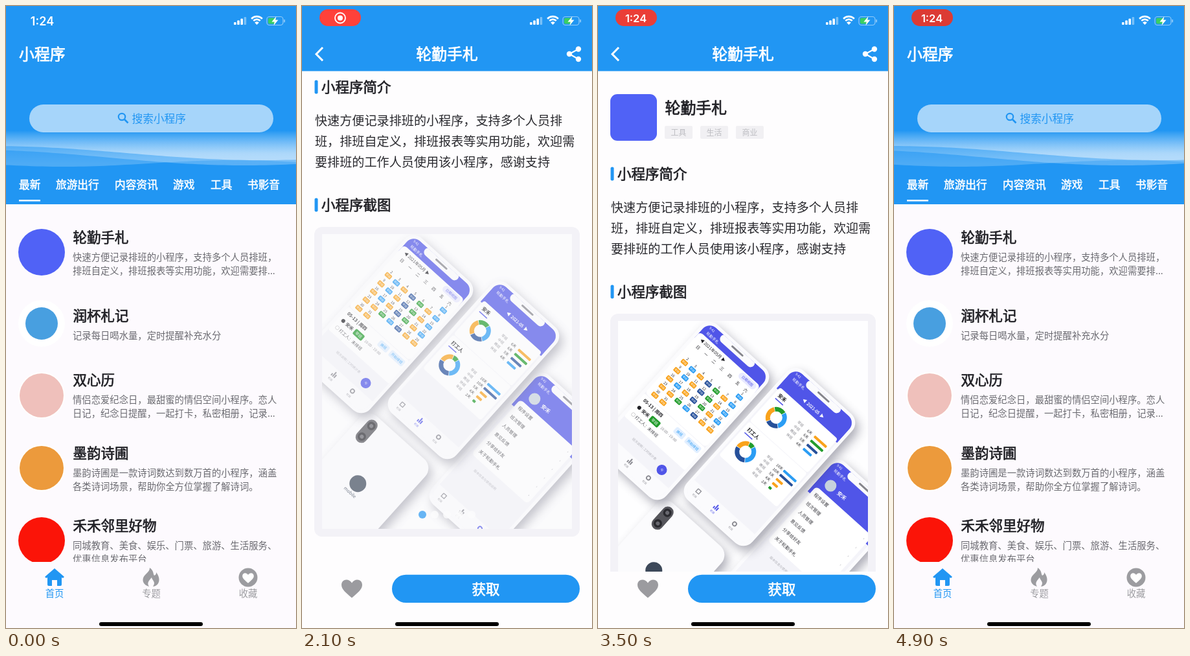
An HTML page with a canvas that plays this animation: 448 by 960 pixels, repeating every 5000 ms.

```html
<!DOCTYPE html>
<html lang="zh-CN">
<head>
<meta charset="utf-8">
<title>小程序</title>
<style>
html, body { margin: 0; width: 100%; height: 100%; overflow: hidden; background: #fdfafe; }
canvas { display: block; width: 448px; height: 960px; }
</style>
</head>
<body>
<canvas id="stage"></canvas>
<script>
const W = 448, H = 960, LOOP = 5000, BAR = 100.5;
const BLUE = '#2196f3', INK = '#212126', GREY = '#6a6a70', PAGE = '#fefdfe', HOME = '#fdfafe';
const PURPLE = '#5055e8', ORANGE = '#f9a21b', SKY = '#2b9df4', NAVY = '#26509a', GREEN = '#229c2c';
const APP = '轮勤手札';
const canvas = document.getElementById('stage');
const c = canvas.getContext('2d');
const dpr = window.devicePixelRatio || 1;
canvas.width = W * dpr;
canvas.height = H * dpr;

const clamp = v => Math.max(0, Math.min(1, v));
const span = (t, a, b) => clamp((t - a) / (b - a));
const easeOut = v => 1 - (1 - v) ** 3;
const easeInOut = v => v * v * (3 - 2 * v);

function bezier(x1, y1, x2, y2, x) {
  const at = (s, a, b) => 3 * (1 - s) ** 2 * s * a + 3 * (1 - s) * s * s * b + s ** 3;
  let lo = 0, hi = 1;
  for (let i = 0; i < 24; i++) {
    const m = (lo + hi) / 2;
    if (at(m, x1, x2) < x) lo = m; else hi = m;
  }
  return at(lo, y1, y2);
}
const pageEase = v => v >= 1 ? 1 : bezier(.35, .91, .33, .97, v);

// y is the optical centre of the line; weight 500 is thickened with a hairline
function text(s, x, y, size, color, weight = 400, align = 'left', family = '"Noto Sans CJK SC", "Noto Sans CJK"') {
  const medium = weight === 500;
  c.font = `${medium ? 400 : weight} ${size}px ${family}, sans-serif`;
  c.fillStyle = color;
  c.textAlign = align;
  c.fillText(s, x, y + size * .37);
  if (medium) {
    c.strokeStyle = color;
    c.lineWidth = size * .032;
    c.strokeText(s, x, y + size * .37);
  }
}
function box(x, y, w, h, r, color) {
  c.fillStyle = color;
  c.beginPath();
  c.roundRect(x, y, w, h, r);
  c.fill();
}
function disc(x, y, r, color) {
  c.fillStyle = color;
  c.beginPath();
  c.arc(x, y, r, 0, 7);
  c.fill();
}
function ring(x, y, r, width, color, from = 0, to = 2 * Math.PI) {
  c.strokeStyle = color;
  c.lineWidth = width;
  c.beginPath();
  c.arc(x, y, r, from, to);
  c.stroke();
}
function line(points, width, color) {
  c.strokeStyle = color;
  c.lineWidth = width;
  c.beginPath();
  points.forEach(([x, y]) => c.lineTo(x, y));
  c.stroke();
}
function shape(x, y, path, color) {
  group(() => {
    c.translate(x, y);
    c.fillStyle = color;
    c.fill(new Path2D(path));
  });
}
function group(fn) { c.save(); fn(); c.restore(); }
function clip(x, y, w, h) {
  c.beginPath();
  c.rect(x, y, w, h);
  c.clip();
}

const HEART = 'M0 14C-9 6-16 1-16-6C-16-15-5-17 0-9C5-17 16-15 16-6C16 1 9 6 0 14Z';
const FLAME = 'M-2-15C5-10 3-5 5-3C8-4 8-6 8-8C16 2 13 13 3 14C8 7 2 5 1 0C-3 5-7 8-3 14C-14 11-15 1-8-5C-4-9-2-11-2-15Z';
const HOUSE = 'M0-14L15-1L13 1L11 0V11Q11 13 9 13H4V4H-4V13H-9Q-11 13-11 11V0L-13 1L-15-1Z';

const tabs = [['最新', 20], ['旅游出行', 77], ['内容资讯', 168], ['游戏', 258], ['工具', 316], ['书影音', 373]];
const items = [
  [357, APP, ['快速方便记录排班的小程序，支持多个人员排班，', '排班自定义，排班报表等实用功能，欢迎需要排...'], 380, 36, '#5062f6'],
  [478, '润杯札记', ['记录每日喝水量，定时提醒补充水分'], 490, 25, '#489fe0'],
  [577, '双心历', ['情侣恋爱纪念日，最甜蜜的情侣空间小程序。恋人', '日记，纪念日提醒，一起打卡，私密相册，记录...'], 601, 34, '#efc0bb'],
  [690, '墨韵诗圃', ['墨韵诗圃是一款诗词数达到数万首的小程序，涵盖', '各类诗词场景，帮助你全方位掌握了解诗词。'], 713, 34, '#ec9a3c'],
  [802, '禾禾邻里好物', ['同城教育、美食、娱乐、门票、旅游、生活服务、', '优惠信息发布平台'], 825, 36, '#fb1408']
];

// base line, height, frequency, phase, direction, brightness
const waves = [
  [227, 11, .0075, -1.4, 1, .45],
  [234, 12, .0075, -1.2, -1, .25],
  [243, 5, .012, .5, 1, .2]
];
function drawWaves(t) {
  for (const [base, amp, k, phase, dir, light] of waves) {
    const g = c.createLinearGradient(0, 192, 0, base);
    g.addColorStop(0, 'rgba(255,255,255,0)');
    g.addColorStop(1, `rgba(255,255,255,${light})`);
    c.fillStyle = g;
    c.beginPath();
    c.moveTo(0, 192);
    for (let x = 0; x <= W; x += 8)
      c.lineTo(x, base + amp * Math.sin(k * x + phase + dir * t / LOOP * 2 * Math.PI));
    c.lineTo(W, 192);
    c.fill();
  }
}

function drawHome(t) {
  box(0, 0, W, H, 0, HOME);
  box(0, 0, W, 306, 0, BLUE);
  text('小程序', 20, 74, 23.9, '#fff', 500);
  drawWaves(t);
  box(36, 152, 377, 43, 21.5, 'rgba(255,255,255,.6)');
  ring(179, 171, 5.2, 2.2, BLUE);
  line([[183, 175], [188.5, 180.5]], 2.6, BLUE);
  text('搜索小程序', 194.5, 173.5, 16.7, BLUE);
  tabs.forEach(([s, x]) => text(s, x, 276, 16.7, '#fff', 500));
  box(20, 299, 33, 2.4, 0, '#fff');

  group(() => {
    clip(0, 306, W, 552);
    items.forEach(([y, name, lines, cy, r, color], i) => {
      c.globalAlpha = i && t > 3800 ? span(t, 4000, 4400) : 1;
      disc(55, cy, 36, '#fff');
      disc(55, cy, r, color);
      c.globalAlpha = 1;
      text(name, 103.5, y, 21.5, INK, 500);
      lines.forEach((s, n) => text(s, 103, y + 31 + n * 20.5, 14.34, GREY));
    });
  });

  const off = '#9c9ca0';
  shape(75, 882, HOUSE, BLUE);
  shape(224, 882, FLAME, off);
  disc(374, 882, 14.5, off);
  group(() => {
    c.translate(374, 883);
    c.scale(.55, .55);
    shape(0, 0, HEART, '#fff');
  });
  text('首页', 75, 907, 14.34, BLUE, 400, 'center');
  text('专题', 224.5, 907, 14.34, off, 400, 'center');
  text('收藏', 374, 907, 14.34, off, 400, 'center');
}

// Handsets share one tilt; their contents use centre-based coordinates
function handset(x, y, back, content) {
  group(() => {
    c.translate(x, y);
    c.rotate(42 * Math.PI / 180);
    group(() => {
      c.shadowColor = 'rgba(60,60,80,.42)';
      c.shadowBlur = 16 * dpr;
      c.shadowOffsetX = 5 * dpr;
      c.shadowOffsetY = 8 * dpr;
      box(-68, -134, 136, 268, 19, '#fbfbfd');
    });
    if (!back) {
      c.beginPath();
      c.roundRect(-63, -129, 126, 258, 15);
      c.clip();
      box(-63, -129, 126, 258, 0, '#f4f4f9');
    }
    content();
    if (!back) {
      box(-34, -131, 68, 13, 7, '#fbfbfd');
      box(-12, -126, 24, 3, 2, '#85858c');
    }
  });
}
function header(bottom) {
  box(-63, -129, 126, bottom + 129, 0, PURPLE);
  text('9:42', -56, -123, 5, '#fff');
  text(APP, -54, -114, 6, '#fff');
}
function tabIcons(active) {
  box(-63, 104, 126, 25, 0, '#fbfbfd');
  [-46, -9, 29].forEach((x, i) => {
    const color = i === active ? PURPLE : '#8b8b92';
    if (i === 1) [4, 9, 6].forEach((h, n) => box(x - 4 + n * 3, 117 - h, 2, h, 0, color));
    else if (i === 2) ring(x, 113, 3, 1.8, color);
    else line([[x - 3, 110], [x + 3, 110], [x + 3, 116], [x - 3, 116], [x - 3, 110]], 1.3, color);
    text('栏目', x, 122, 4, color, 400, 'center');
  });
}
function donut(x, y, parts) {
  let a = -1.2;
  parts.forEach(([f, color]) => {
    const end = a + f * 2 * Math.PI;
    ring(x, y, 13, 7, color, a, end - .06);
    a = end;
  });
}

function calendarScreen() {
  header(-95);
  box(-63, -108, 126, 127, 6, '#fff');
  box(26, -106, 33, 11, 5.5, '#e9eaff');
  text('日期视图', 42.5, -100.5, 5.5, PURPLE, 400, 'center');
  text('◀ 2021年05月 ▶', -29, -100, 6.5, INK, 400, 'center');
  [...'日一二三四五六'].forEach((s, i) => text(s, -49 + i * 16.5, -88, 6.5, INK, 400, 'center'));
  const colors = [ORANGE, SKY, ORANGE, NAVY, GREEN];
  for (let d = 1; d <= 31; d++) {
    const cell = d + 5, col = cell % 7, row = Math.floor(cell / 7);
    const x = -49 + col * 16.5, y = -77 + row * 17;
    text(d, x, y - 4, 5.5, INK, 400, 'center');
    box(x - 5.5, y, 11, 7, 1.5, colors[(col + row * 5 + (row > 3 ? col : 0)) % 5]);
    text('早班', x, y + 3.5, 4.2, '#fff', 400, 'center');
  }
  box(-63, 20, 126, 47, 3, '#fff');
  text('05-13 | 周四', -57, 28, 7, INK, 700);
  disc(-54, 42, 3, INK);
  text('安禾', -48, 42, 7, INK, 500);
  box(-31, 37, 18, 10, 2, GREEN);
  text('早班', -22, 42, 6, '#fff', 400, 'center');
  text('10:00 - 19:00', -9, 42, 5.5, '#88888f');
  text('○ 打工人：未排班', -57, 56, 6.5, '#44444a');
  box(9, 24, 19, 11, 3, '#e2efff');
  text('换班', 18.5, 29.5, 5.5, SKY, 400, 'center');
  box(32, 24, 28, 11, 3, '#e2efff');
  text('开始排班', 46, 29.5, 5.5, SKY, 400, 'center');
  text('班次说明 | 工时统计表', -30, 84, 5, '#b1b1b8');
  disc(36, 90, 8, PURPLE);
  text('今', 36, 90, 5, '#fff', 400, 'center');
  tabIcons(0);
}

function reportCard(y, name, size, parts, bars) {
  box(-60, y - 10, 120, 70, 4, '#fff');
  text(name, -54, y, 7.5, INK, 700);
  box(-54, y + 7, 16, 1.5, 0, PURPLE);
  donut(-33, y + 29, parts);
  bars.forEach(([n, color], i) => {
    const row = y + 11 + i * 8.5;
    text('早中晚休年'[i] + '班', -4, row, 5.5, '#88888f');
    text(n + '天', 16, row, 5.5, INK);
    box(30, row - 2, n * size, 4, 1, color);
  });
}
function reportScreen() {
  header(-86);
  text('◀  2021-05  ▶', 0, -101, 6.5, '#fff', 500, 'center');
  reportCard(-81, '安禾', 4.2, [[.3, SKY], [.22, NAVY], [.28, ORANGE], [.2, GREEN]],
    [[6, ORANGE], [6, GREEN], [5, NAVY], [4, SKY]]);
  reportCard(-10, '打工人', 2.6, [[.34, SKY], [.33, NAVY], [.23, ORANGE], [.1, GREEN]],
    [[10, SKY], [10, NAVY], [5, ORANGE], [4, ORANGE], [2, GREEN]]);
  tabIcons(1);
}
function settingsScreen() {
  header(-62);
  disc(-42, -92, 9, '#c7d2dd');
  text('安禾', -27, -92, 8, '#fff', 500);
  box(-58, -77, 116, 113, 6, '#fff');
  ['程序设置', '班次管理', '人员管理', '意见反馈', '分享给好友', '关于' + APP].forEach((s, i) => {
    text(s, -52, -66 + i * 18, 7, '#3c3c42');
    text('›', 50, -66 + i * 18, 6, '#9999a0');
  });
  text('版本信息与使用说明', -38, 52, 5, '#b1b1b8');
  tabIcons(2);
}

function drawPhoto() {
  group(() => {
    clip(31, 486, 386, 455);
    box(31, 486, 386, 455, 0, '#fefeff');
    c.translate(0, 134);
    handset(329, 703, false, settingsScreen);
    handset(63, 766, true, () => {
      box(-55, -127, 18, 42, 9, '#55555b');
      [-117, -95].forEach(y => {
        disc(-46, y, 6.5, '#29292e');
        disc(-46, y, 3, '#68686f');
      });
      disc(-2, -37, 13, '#3d495a');
      text('mobile', -2, -19, 7, '#3d495a', 400, 'center');
    });
    handset(132, 491, false, calendarScreen);
    handset(265, 562, false, reportScreen);
    for (let i = 0; i < 5; i++) disc(186 + i * 19, 785, 6, i ? 'rgba(255,255,255,.85)' : BLUE);
  });
}

function scrollAt(t) {
  if (t < 2400) return 134 * easeOut(span(t, 1550, 2050));
  if (t < 2850) return 134 - 146 * easeInOut(span(t, 2400, 2850));
  return -12 * (1 - span(t, 2850, 3250)) ** 2;
}

function section(name, y) {
  box(19.5, y - 10.5, 5, 21, 2, BLUE);
  text(name, 30, y, 21.5, INK, 500);
}

function drawBody(t) {
  group(() => {
    clip(0, BAR, W, 873 - BAR);
    c.translate(0, -scrollAt(t));
    box(19, 136, 72, 72, 11, '#5062f6');
    text(APP, 103.5, 157, 23.9, INK, 500);
    ['工具', '生活', '商业'].forEach((s, i) => {
      box(103 + i * 55, 185, 43, 20, 2, '#f1f0f3');
      text(s, 124.5 + i * 55, 195.5, 11.95, '#bdbdc2', 400, 'center');
    });
    section('小程序简介', 259);
    ['快速方便记录排班的小程序，支持多个人员排', '班，排班自定义，排班报表等实用功能，欢迎需', '要排班的工作人员使用该小程序，感谢支持']
      .forEach((s, i) => text(s, 20, 310.5 + i * 32.4, 19.12, '#29292e'));
    section('小程序截图', 441);
    box(19, 475, 410, 478, 12, '#f3f2f7');
    const shown = span(t, 1700, 2300);
    if (shown > 0) {
      drawPhoto();
      // veil gives the picture its fade without re-blending each layer
      c.globalAlpha = 1 - shown;
      box(31, 486, 386, 455, 0, '#f3f2f7');
    }
  });
  shape(77, 899.5, HEART, '#9b9b9f');
  box(139, 877.7, 290, 43.4, 21.7, BLUE);
  text('获取', 284, 900, 21.5, '#fff', 500, 'center');
}

function drawDetail(t) {
  box(0, 0, W, H, 0, PAGE);
  box(0, 0, W, BAR, 0, BLUE);
  const press = span(t, 3600, 3850) * (1 - span(t, 4000, 4250));
  if (press > 0) group(() => {
    clip(0, 0, W, BAR);
    disc(36, 74, 24 + 18 * span(t, 3600, 3850), `rgba(255,255,255,${.13 * press})`);
  });
  line([[32, 64], [22, 74.2], [32, 84.4]], 3, '#fff');
  text(APP, 224, 74, 23.9, '#fff', 500, 'center');
  if (t >= 1300) {
    const share = [[427, 66.5], [413, 74], [427, 82]];
    line(share, 2.2, '#fff');
    share.forEach(([x, y]) => disc(x, y, 4.2, '#fff'));
    drawBody(t);
  } else {
    c.fillStyle = BLUE;
    c.beginPath();
    for (let a = 0; a < 6.28; a += .1) {
      const r = 16.9 + .4 * Math.sin(4 * a + t / 130);
      c.lineTo(224 + r * Math.cos(a), 533 + r * Math.sin(a));
    }
    c.fill();
  }
}

function drawEdgeShadow(x) {
  const g = c.createLinearGradient(x - 22.4, 0, x, 0);
  [[0, 0], [.3, .016], [.6, .07], [1, .22]].forEach(([at, a]) => g.addColorStop(at, `rgba(0,0,0,${a})`));
  box(x - 22.4, 0, 22.4, H, 0, g);
}

function drawStatus(t) {
  const clock = (x, y, size) => text('1:24', x, y, size, '#fff', 600, 'center', 'Inter');
  if (t < 300) clock(56, 23, 18);
  else {
    const glow = .5 + .5 * Math.cos((t - 2050) / 1000 * Math.PI);
    box(27, 5, 64, 26, 13, `rgb(${218 + 37 * glow},${59 + 6 * glow},${52 + 6 * glow})`);
    if (t < 3500) {
      ring(59, 18.5, 8, 1.8, '#fff');
      disc(59, 18.5, 4, '#fff');
    } else clock(58.5, 18.5, 16.5);
  }
  for (let i = 0; i < 4; i++)
    box(352 + i * 5.2, 25 - i * 2.7, 3.6, 4 + i * 2.7, 1, i < 3 ? '#fff' : 'rgba(255,255,255,.4)');
  [7.3, 11.8].forEach(r => ring(387.5, 28, r, 2.7, '#fff', -2.36, -.78));
  shape(387.5, 29, 'M0 0L-3.4-3.5Q0-6.5 3.4-3.5Z', '#fff');
  c.strokeStyle = 'rgba(255,255,255,.5)';
  c.lineWidth = 1.2;
  c.beginPath();
  c.roundRect(403, 16.5, 25, 13, 4);
  c.stroke();
  box(429.3, 20.7, 1.8, 4.6, 1, 'rgba(255,255,255,.5)');
  box(405, 18.5, 12, 9, 2, '#3bcf62');
  shape(415.5, 23, 'M2-7L-5 1.5H-.7L-2 7L5-1.5H.7Z', '#fff');
  box(144, 951, 160, 6, 3, '#000');
}

function draw(t) {
  c.setTransform(dpr, 0, 0, dpr, 0, 0);
  const open = t < 3000 ? pageEase(span(t, 520, 920)) : 1 - pageEase(span(t, 3845, 4245));
  const x = W * (1 - open);
  if (open < 1) group(() => {
    c.translate(-open * W / 3, 0);
    drawHome(t);
  });
  if (open > 0) {
    if (open < 1) drawEdgeShadow(x);
    group(() => {
      c.translate(x, 0);
      drawDetail(t);
    });
  }
  drawStatus(t);
}

const start = performance.now();
function tick() {
  const t = (performance.now() - start) % LOOP;
  draw(Math.floor(t / 100) * 100);
  requestAnimationFrame(tick);
}
tick();
</script>
</body>
</html>
```
